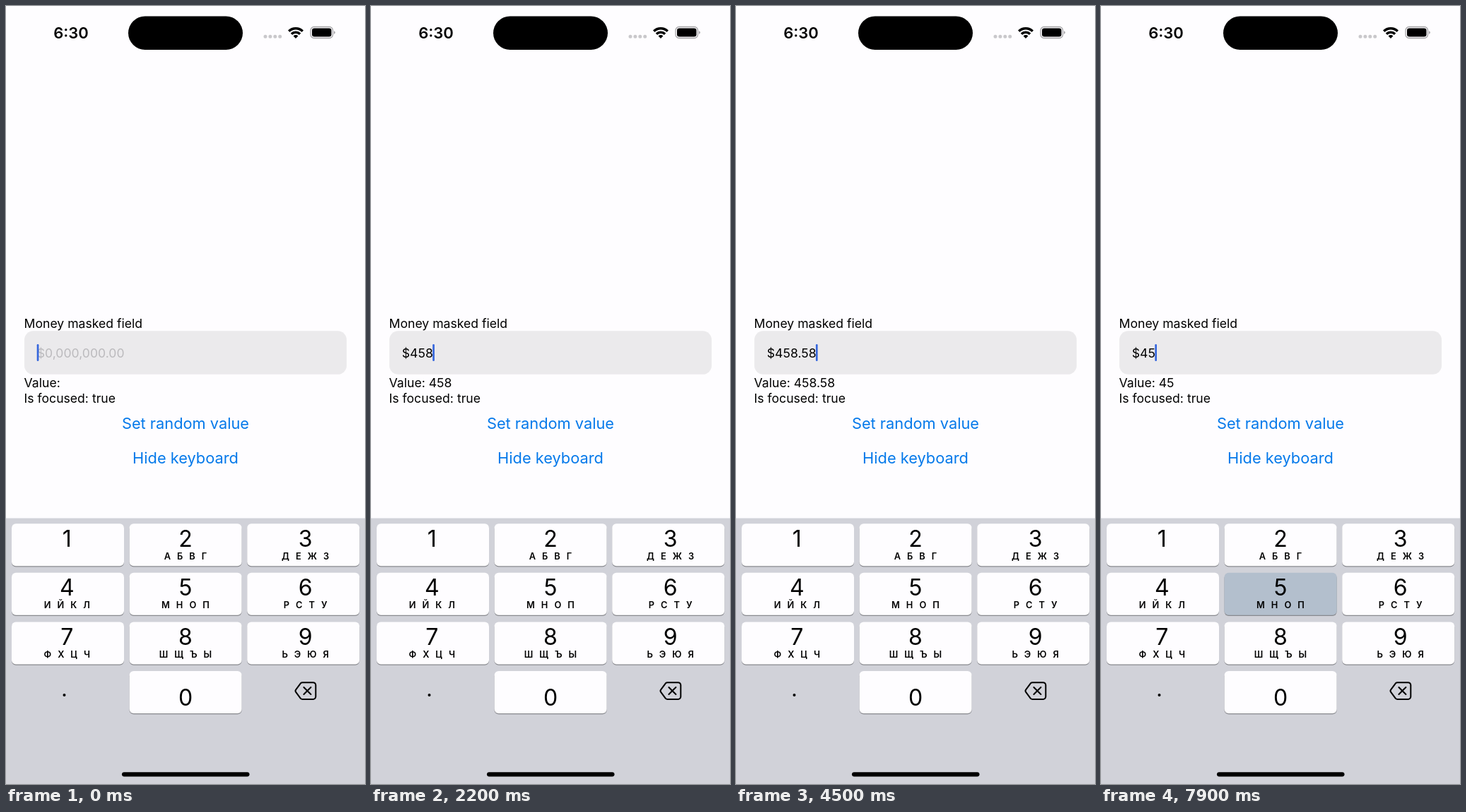
These frames come from a looping animation (508 by 1102 pixels, 8 s). An HTML page:

```html
<!DOCTYPE html>
<html lang="en">
<head>
<meta charset="utf-8">
<title>Money masked field</title>
<style>
html, body { margin: 0; width: 100%; height: 100%; overflow: hidden; background: #fefdff; }
svg { display: block; width: 508px; height: 1102px; font-family: Inter, "Liberation Sans", sans-serif; }
text { white-space: pre; }
.body { font-size: 17.6px; }
.link { font-size: 21.8px; fill: #0479ea; text-anchor: middle; }
.digit { font-size: 32px; text-anchor: middle; }
.letters { font-size: 12.8px; font-weight: 600; letter-spacing: 2.9px; text-anchor: middle; }
</style>
</head>
<body>
<svg viewBox="0 0 508 1102">
  <rect width="508" height="1102" fill="#fefdff"/>

  <!-- status bar -->
  <text x="92" y="46" font-size="22" font-weight="600" text-anchor="middle">6:30</text>
  <rect x="173" y="14.5" width="162" height="47.5" rx="23.75"/>
  <path d="M367 43.3H390" stroke="#c9c8cb" stroke-width="5" stroke-linecap="round" stroke-dasharray="0 6.9"/>
  <g fill="none" stroke="#000" stroke-width="3.4">
    <path d="M400.2 35.8a14 14 0 0 1 19.6 0"/>
    <path d="M403.9 39.8a8.7 8.7 0 0 1 12.2 0"/>
  </g>
  <path d="M410 46l-3.4-3.5a4.8 4.8 0 0 1 6.8 0z"/>
  <rect x="431" y="29.5" width="31.5" height="16" rx="5" fill="none" stroke="#a5a4a7" stroke-width="1.3"/>
  <rect x="433" y="31.5" width="27.5" height="12" rx="3.3"/>
  <path d="M464 35.3q1.9 .8 1.9 2.3t-1.9 2.3z" fill="#a5a4a7"/>

  <!-- form -->
  <g class="body">
    <text x="25.6" y="455.5">Money masked field</text>
    <rect x="26" y="460.3" width="456" height="61.5" rx="12.5" fill="#ebeaec"/>
    <text id="field" x="43.8" y="497.6"></text>
    <rect id="caret" y="479" width="2.7" height="24" rx="1.2" fill="#3667dd"/>
    <text id="value" x="25.6" y="539.6"></text>
    <text x="25.6" y="561.5">Is focused: true</text>
  </g>
  <text class="link" x="254" y="599">Set random value</text>
  <text class="link" x="254" y="648">Hide keyboard</text>

  <!-- keyboard -->
  <rect y="725.5" width="508" height="376.5" fill="#d1d2d9"/>
  <g id="keys"></g>
  <circle cx="82.5" cy="976" r="2"/>
  <g stroke="#000" stroke-width="2" stroke-linejoin="round" stroke-linecap="round">
    <path id="erase" d="M419.5 958.2H434.5a3.8 3.8 0 0 1 3.8 3.8V978.200a3.800 3.800 0 0 1-3.800 3.800H419.500q-1.500 0-2.600-1.100L410.200 971.800q-1.400-1.700 0-3.400L416.900 959.300q1.100-1.100 2.600-1.100z"/>
    <path id="cross" d="M421.400 965l10 10m0-10l-10 10"/>
  </g>
  <rect x="164" y="1085.200" width="180.500" height="6.300" rx="3.150"/>
</svg>
<script>
const LOOP = 8000;
const $ = id => document.getElementById(id);
const field = $("field"), value = $("value"), caret = $("caret");

const letters = ["", "АБВГ", "ДЕЖЗ", "ИЙКЛ", "МНОП", "РСТУ", "ФХЦЧ", "ШЩЪЫ", "ЬЭЮЯ"];
const centers = [86.3, 254, 423.7];

function keyMarkup(digit) {
  const i = digit ? digit - 1 : 10;
  const col = i % 3, row = Math.floor(i / 3);
  const x = 8 + 166.6 * col, y = 733.2 + 69.6 * row;
  const box = `x="${x}" width="159" height="60" rx="6"`;
  const sub = letters[i]
    ? `<text class="letters" x="${centers[col] + 1.4}" y="${y + 50.6}">${[...letters[i]].join(" ")}</text>` : "";
  return `<rect ${box} y="${y + 1.3}" fill="#88898e"/>
    <rect ${box} y="${y}" id="key${digit}"/>
    <text class="digit" x="${centers[col]}" y="${y + (digit ? 32.6 : 49)}">${digit}</text>${sub}`;
}
$("keys").innerHTML = [...Array(10).keys()].map(keyMarkup).join("");

// [key, down, up] in ms; "<" is the erase key
const taps = [
  [4, 1100, 1300], [5, 1500, 1700], [8, 1900, 2000],
  [5, 3100, 3200], [8, 3400, 3600],
  [9, 3800, 4000], [9, 4200, 4400], [6, 4600, 4800],
  ["<", 6900, 7000], ["<", 7200, 7300], ["<", 7400, 7500], ["<", 7600, 7700],
  [5, 7900, 8000]
];
// digits appear on release, erasing happens on press
const edits = [
  [0, ""], [1300, "4"], [1700, "45"], [2000, "458"], [2700, "458."],
  [3200, "458.5"], [3600, "458.58"],
  [6900, "458.5"], [7200, "458."], [7400, "458"], [7600, "45"]
];
const blinks = [50, 4900, 6450];

const clamp = v => Math.max(0, Math.min(1, v));

function caretOpacity(t) {
  const start = blinks.find(b => t >= b && t < b + 500);
  if (start === undefined) return 1;
  const d = t - start;
  return Math.max(clamp(1 - d / 100), clamp((d - 300) / 200));
}

function draw(t) {
  const text = edits.filter(e => e[0] <= t).pop()[1];
  const held = taps.filter(([, down, up]) => t >= down && t < up).map(tap => tap[0]);

  field.textContent = text ? "$" + text : "$0,000,000.00";
  field.setAttribute("fill", text ? "#000" : "#bbbabd");
  value.textContent = "Value: " + text;
  caret.setAttribute("x", 43.7 + (text ? field.getComputedTextLength() - 0.5 : 0));
  caret.setAttribute("opacity", caretOpacity(t));

  for (let d = 0; d < 10; d++)
    $("key" + d).setAttribute("fill", held.includes(d) ? "#b3bfcd" : "#fefdff");
  const erasing = held.includes("<");
  $("erase").setAttribute("fill", erasing ? "#000" : "none");
  $("cross").setAttribute("stroke", erasing ? "#d1d2d9" : "#000");
}

function tick() {
  draw(performance.now() % LOOP);
  requestAnimationFrame(tick);
}
tick();
</script>
</body>
</html>
```
